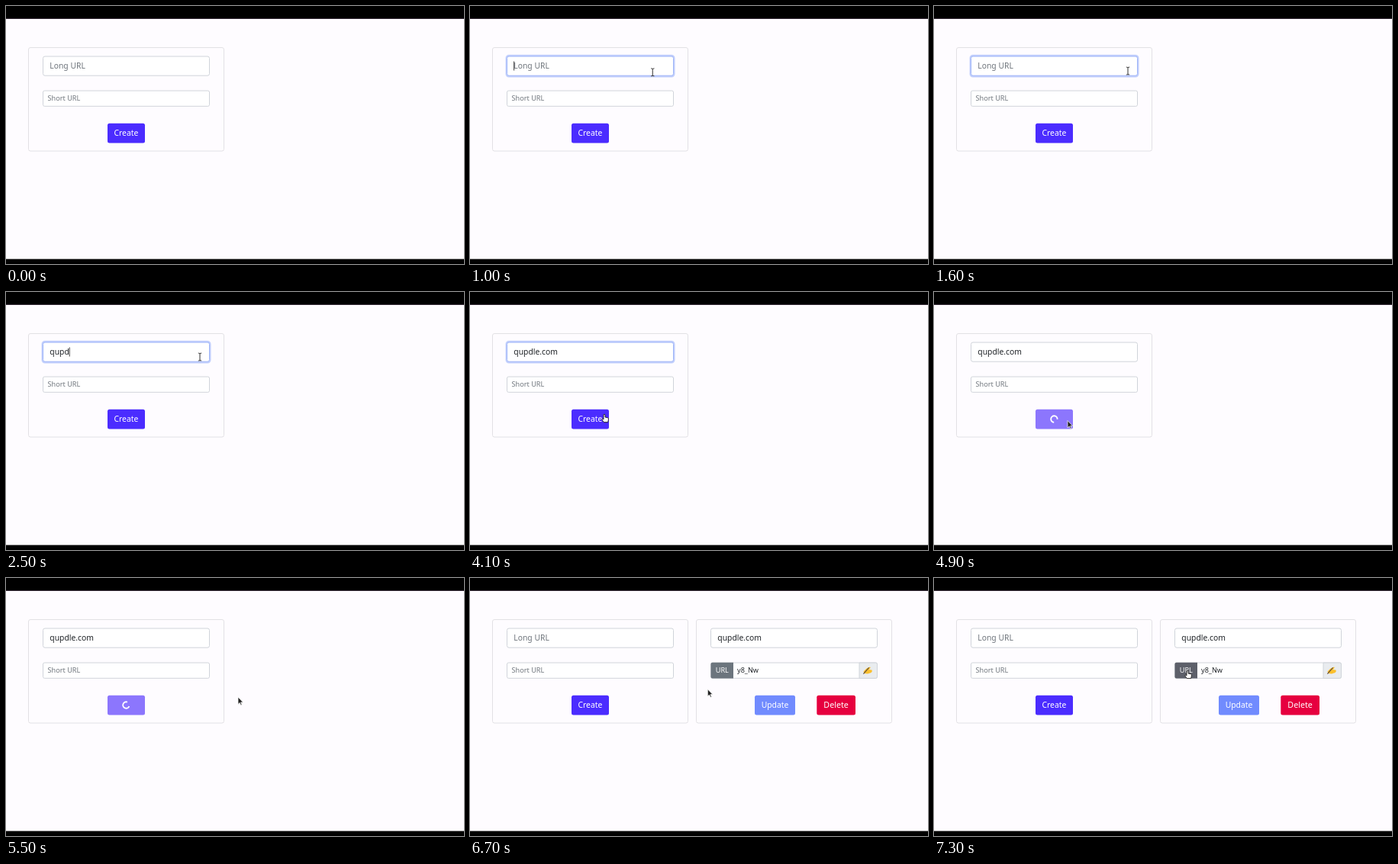
Write an HTML page that moves like this. It is 600x338 px and loops after 8 s.

```html
<!DOCTYPE html>
<html lang="en">
<head>
<meta charset="utf-8">
<title>Link shortener form</title>
<style>
  html, body { margin: 0; width: 100%; height: 100%; overflow: hidden; background: #fefcff; }
  svg { display: block; width: 100vw; height: 100vh; }
  text { font: 10.35px "Noto Sans", "Open Sans", sans-serif; fill: #212529; white-space: pre; }
  .small { font-size: 9.15px; }
  .hint { fill: #70767d; }
  .label { fill: #fff; text-anchor: middle; }
  .card { fill: none; stroke: #e2e1e5; }
  .field { fill: #fff; stroke: #d0d4da; }
  .ring { fill: none; stroke: #c3d0fc; stroke-width: 2.6; }
</style>
</head>
<body>
<svg viewBox="0 0 600 338" preserveAspectRatio="none">
  <rect width="600" height="338" fill="#fefcff"/>
  <rect width="600" height="16" fill="#000"/>
  <rect y="16" width="600" height="1" fill="#2e2430"/>
  <rect y="331.5" width="600" height="6.5" fill="#000"/>

  <rect class="card" x="29.5" y="54.5" width="256" height="135.5" rx="2.5"/>
  <rect id="fieldRing" class="ring" x="47.8" y="65" width="219.4" height="27.2" rx="3.2"/>
  <rect id="longField" class="field" x="48.5" y="66" width="218" height="25.2" rx="2.5"/>
  <text id="longText" x="57.3" y="82"></text>
  <rect id="caret" y="72.5" width=".8" height="12" fill="#111"/>
  <rect class="field" x="48.5" y="111" width="218" height="20.3" rx="2"/>
  <text class="small hint" x="54.6" y="124.3">Short URL</text>
  <rect id="buttonRing" class="ring" x="132" y="152.8" width="51" height="27.6" rx="3.4"/>
  <rect id="create" x="133" y="153.8" width="49" height="25.6" rx="2.5"/>
  <text id="createText" class="label" x="157.4" y="170.2">Create</text>
  <path id="spinner" d="M2.97 2.97A4.2 4.2 0 1 1 2.97 -2.97" fill="none" stroke="#fff" stroke-width="1.9"/>

  <g id="result">
    <rect class="card" x="296.5" y="54.5" width="256" height="135.5" rx="2.5"/>
    <rect class="field" x="315.5" y="66" width="218" height="25.2" rx="2.5"/>
    <text x="324.3" y="82">qupdle.com</text>
    <rect class="field" x="315.5" y="111" width="218" height="20.3" rx="2"/>
    <path id="urlButton" d="M345 110.7H317.5Q315.5 110.7 315.5 112.7V129.6Q315.5 131.6 317.5 131.6H345Z"/>
    <text class="small label" x="330.3" y="124.3">URL</text>
    <text class="small" x="350" y="124.3">y8_Nw</text>
    <path d="M510 111H531.5Q533.5 111 533.5 113V129.3Q533.5 131.3 531.5 131.3H510Z" fill="#e9ecef" stroke="#d0d4da"/>
    <path d="M515.5 122.5L519.5 118.5L524 116.5Q525.5 117 524 118.5L522.5 120L526.5 120.5Q527.5 122.5 525.5 124L521 125.5L516.5 125Z" fill="#fbc02d"/>
    <path d="M515.4 125.6L522.6 117.4" stroke="#5b4a3a" stroke-width="1.1"/>
    <rect x="373" y="153.8" width="53" height="25.6" rx="2.5" fill="#718bfe"/>
    <text class="label" x="399.5" y="170.2">Update</text>
    <rect x="454.3" y="153.8" width="50.7" height="25.6" rx="2.5" fill="#e6003f"/>
    <text class="label" style="font-size:10.7px" x="479.6" y="170.2">Delete</text>
  </g>

  <g id="pointer">
    <path id="arrow" d="M0 0V9.4L2.2 7.4L3.7 10.7L5.1 10L3.7 6.9H6.6Z" fill="#222" stroke="#fff" stroke-width=".7"/>
    <path id="beam" d="M-2.2 -5Q0 -5 0 -4Q0 -5 2.2 -5M0 -4V4M-2.2 5Q0 5 0 4Q0 5 2.2 5" fill="none" stroke="#444" stroke-width="1.1"/>
    <path id="hand" d="M-1 .8Q0 -.6 1 .8V4L4.6 4.8Q5.6 5.2 5.4 7L4.7 10.6H-.6L-3.3 6.9Q-3 5.6 -1.9 6.3L-1 7Z" fill="#fff" stroke="#222" stroke-width=".9"/>
  </g>
</svg>
<script>
const LOOP = 8000, STEP = 100;
const FOCUS = 900, CLICK = 4400, LOADING = 4800, DONE = 5600;
const ADDRESS = "qupdle.com";
const KEYS = [2200, 2300, 2400, 2500, 2600, 2800, 3000, 3200, 3300, 3500];

// Pointer path: time, x, y
const PATH = [
  [500, 537, 150], [600, 490, 138], [900, 236, 87], [1300, 249, 86], [1600, 254, 85],
  [3800, 254, 85], [4000, 208, 133], [4100, 176, 160], [4300, 158, 170], [4500, 155, 170],
  [4800, 155, 170], [5000, 195, 167], [5300, 290, 158], [5500, 304, 156],
  [6600, 304, 156], [6900, 326, 125], [7100, 332, 121]
];

const $ = id => document.getElementById(id);
const show = (id, on) => $(id).style.display = on ? "" : "none";
const fill = (id, color) => $(id).setAttribute("fill", color);
const move = (id, x, y, turn = 0) =>
  $(id).setAttribute("transform", `translate(${x} ${y}) rotate(${turn})`);

function pointerAt(t) {
  const next = PATH.findIndex(p => p[0] > t);
  if (next < 0) return PATH[PATH.length - 1].slice(1);
  const [t0, x0, y0] = PATH[Math.max(next - 1, 0)], [t1, x1, y1] = PATH[next];
  const k = Math.max(0, (t - t0) / (t1 - t0));
  return [x0 + (x1 - x0) * k, y0 + (y1 - y0) * k];
}

function drawPointer(t) {
  const [x, y] = pointerAt(t);
  const over = (l, t, r, b) => x >= l && x <= r && y >= t && y <= b;
  const loading = t >= LOADING && t < DONE;
  const onUrl = t >= DONE && over(316, 111, 345, 131);
  const onHand = onUrl || !loading && over(133, 154, 182, 179);
  const onField = over(49, 66, 266, 91) || over(49, 111, 266, 131);
  show("pointer", t >= PATH[0][0]);
  show("hand", onHand);
  show("beam", !onHand && onField);
  show("arrow", !onHand && !onField);
  move("pointer", x, y);
  fill("urlButton", onUrl ? "#5d606a" : "#6c757d");
}

function drawForm(t) {
  const typed = t < DONE ? KEYS.filter(k => k <= t).length : 0;
  const focused = t >= FOCUS && t < CLICK;
  const loading = t >= LOADING && t < DONE;
  const hovered = t >= 4200 && t < LOADING;
  const lastKey = typed ? KEYS[typed - 1] : FOCUS;

  const text = $("longText");
  text.textContent = typed ? ADDRESS.slice(0, typed) : "Long URL";
  text.setAttribute("class", typed ? "" : "hint");
  const width = typed ? text.getComputedTextLength() : 0;
  $("caret").setAttribute("x", 57.3 + width);
  show("caret", focused && Math.floor((t - lastKey) / 500) % 2 === 0);

  show("fieldRing", focused);
  $("longField").style.stroke = focused ? "#9db3f8" : "";
  show("buttonRing", t >= CLICK && t < LOADING);
  fill("create", loading ? "#8c76fd" : hovered ? "#3f25d0" : "#4b2cff");
  show("createText", !loading);
  show("spinner", loading);
  move("spinner", 157.4, 166.5, (t - LOADING) / 750 * 360);
  show("result", t >= DONE);
}

const start = performance.now();
function frame() {
  const elapsed = (performance.now() - start) % LOOP;
  const t = Math.floor(elapsed / STEP) * STEP;
  drawForm(t);
  drawPointer(t);
  requestAnimationFrame(frame);
}
frame();
</script>
</body>
</html>
```
